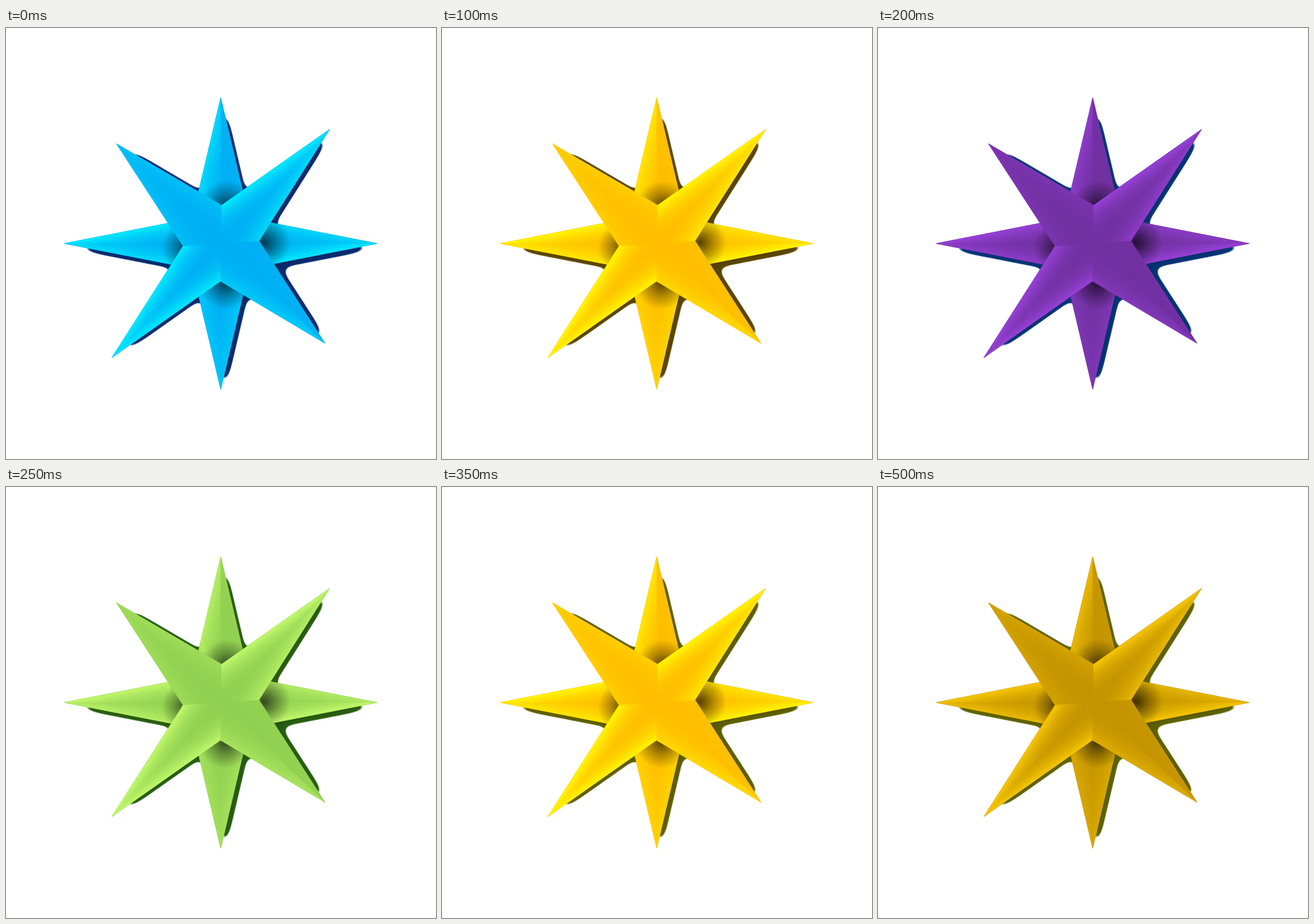
An HTML page with a canvas for the animation above (550 ms loop, 748x749 px).

```html
<!DOCTYPE html>
<html lang="en">
<head>
<meta charset="utf-8">
<title>Star</title>
<style>
html, body { margin: 0; width: 100%; height: 100%; overflow: hidden; background: #fff; }
canvas { display: block; }
</style>
</head>
<body>
<canvas id="stage" width="748" height="749"></canvas>
<script>
const WIDTH = 748, HEIGHT = 749, STEP = 50;
const CENTER = [373.5, 374.5];
const ctx = document.getElementById('stage').getContext('2d');

// Face colour and cast shadow colour
const palettes = [
  ['#00aef4', '#0b3588'],
  ['#f00000', '#780808'],
  ['#ffbe00', '#6e5600'],
  ['#00b050', '#086a30'],
  ['#7030a0', '#044090'],
  ['#90d050', '#327214'],
  ['#0070c0', '#044090'],
  ['#ffbe00', '#737400'],
  ['#c55a11', '#783408'],
  ['#4a8230', '#327204'],
  ['#c49400', '#737800']
];

// Corners alternate between waist and tip, clockwise
const backStar = [0, 1, 2, 3].flatMap(i => {
  const turn = (i - 1) * Math.PI / 2;
  const at = (angle, rx, ry) => [CENTER[0] + rx * Math.cos(angle), CENTER[1] + ry * Math.sin(angle)];
  return [at(turn - Math.PI / 4, 70, 61.5), at(turn, 272.5, 253.5)];
});
const frontStar = [
  [308, 379], [192, 201], [375, 308], [563, 176],
  [440, 370], [555, 548], [373, 440], [184, 573]
];

const polygon = points => new Path2D('M' + points.map(p => p.join()).join('L') + 'Z');
const clamp = (v, low, high) => Math.min(high, Math.max(low, v));

function brighten(hex, alpha) {
  const rgb = [1, 3, 5].map(i => Math.min(255, parseInt(hex.slice(i, i + 2), 16) * 1.4));
  return `rgba(${rgb.join()},${alpha})`;
}

function newLayer() {
  const canvas = document.createElement('canvas');
  canvas.width = WIDTH;
  canvas.height = HEIGHT;
  return canvas.getContext('2d');
}

function blurredShadow() {
  const layer = newLayer();
  layer.shadowColor = '#000';
  layer.shadowBlur = 20;
  layer.translate(-2 * WIDTH, 0);
  for (const [star, dx, dy] of [[backStar, 7, 8], [frontStar, 9, 1]]) {
    layer.shadowOffsetX = 2 * WIDTH + dx;
    layer.shadowOffsetY = dy;
    layer.fill(polygon(star));
  }
  return layer;
}

// Hard-edged silhouette of the soft shadow
function hardened(soft) {
  const image = soft.getImageData(0, 0, WIDTH, HEIGHT);
  for (let i = 3; i < image.data.length; i += 4) {
    image.data[i] = clamp((image.data[i] - 118) * 16, 0, 255);
  }
  const layer = newLayer();
  layer.putImageData(image, 0, 0);
  return layer;
}

const softShadow = blurredShadow();
const hardShadow = hardened(softShadow);
const tinted = newLayer();

function drawShadow(color) {
  tinted.globalCompositeOperation = 'copy';
  tinted.drawImage(hardShadow.canvas, 0, 0);
  tinted.globalCompositeOperation = 'source-in';
  tinted.fillStyle = color;
  tinted.fillRect(0, 0, WIDTH, HEIGHT);
  tinted.globalCompositeOperation = 'source-atop';
  tinted.globalAlpha = 0.3;
  tinted.drawImage(softShadow.canvas, 0, 0);
  tinted.globalAlpha = 1;
  ctx.drawImage(tinted.canvas, 0, 0);
}

// Light fades from the outer edge a-b towards the ridge
function drawFacet(a, b, color) {
  const dx = b[0] - a[0], dy = b[1] - a[1], length = Math.hypot(dx, dy);
  const nx = dy / length, ny = -dx / length;
  const depth = (a[0] - CENTER[0]) * nx + (a[1] - CENTER[1]) * ny;
  const light = clamp(0.3 + 0.7 * nx * ny + 0.45 * ny * ny - 0.15 * nx, 0.05, 0.85);
  const glow = ctx.createLinearGradient(a[0], a[1], a[0] - nx * depth, a[1] - ny * depth);
  for (const stop of [0, 0.25, 0.5, 0.75, 1]) {
    glow.addColorStop(stop, brighten(color, light * (1 - stop) ** 2.4));
  }
  ctx.fillStyle = glow;
  ctx.fill(polygon([a, b, CENTER]));
}

function drawStar(star, color) {
  const shape = polygon(star);
  ctx.fillStyle = ctx.strokeStyle = color;
  ctx.lineJoin = 'bevel';
  ctx.fill(shape);
  ctx.stroke(shape);
  star.forEach((point, i) => drawFacet(point, star[(i + 1) % star.length], color));
}

// Dark pockets on the back star where the front star's waists touch it
function drawPockets() {
  ctx.save();
  ctx.clip(polygon(backStar));
  for (const [wx, wy] of frontStar.filter((_, i) => i % 2 === 0)) {
    const x = wx + 9, y = wy + 3;
    const pocket = ctx.createRadialGradient(x, y, 0, x, y, 46);
    pocket.addColorStop(0, 'rgba(0,0,0,0.65)');
    pocket.addColorStop(0.5, 'rgba(0,0,0,0.3)');
    pocket.addColorStop(1, 'rgba(0,0,0,0)');
    ctx.fillStyle = pocket;
    ctx.fillRect(x - 46, y - 46, 92, 92);
  }
  ctx.restore();
}

function draw([color, shadow]) {
  ctx.fillStyle = '#fff';
  ctx.fillRect(0, 0, WIDTH, HEIGHT);
  drawShadow(shadow);
  drawStar(backStar, color);
  drawPockets();
  drawStar(frontStar, color);
}

const start = performance.now();
let shown = -1;
function tick() {
  const index = Math.floor((performance.now() - start) / STEP) % palettes.length;
  if (index !== shown) draw(palettes[shown = index]);
  requestAnimationFrame(tick);
}
tick();
</script>
</body>
</html>
```
